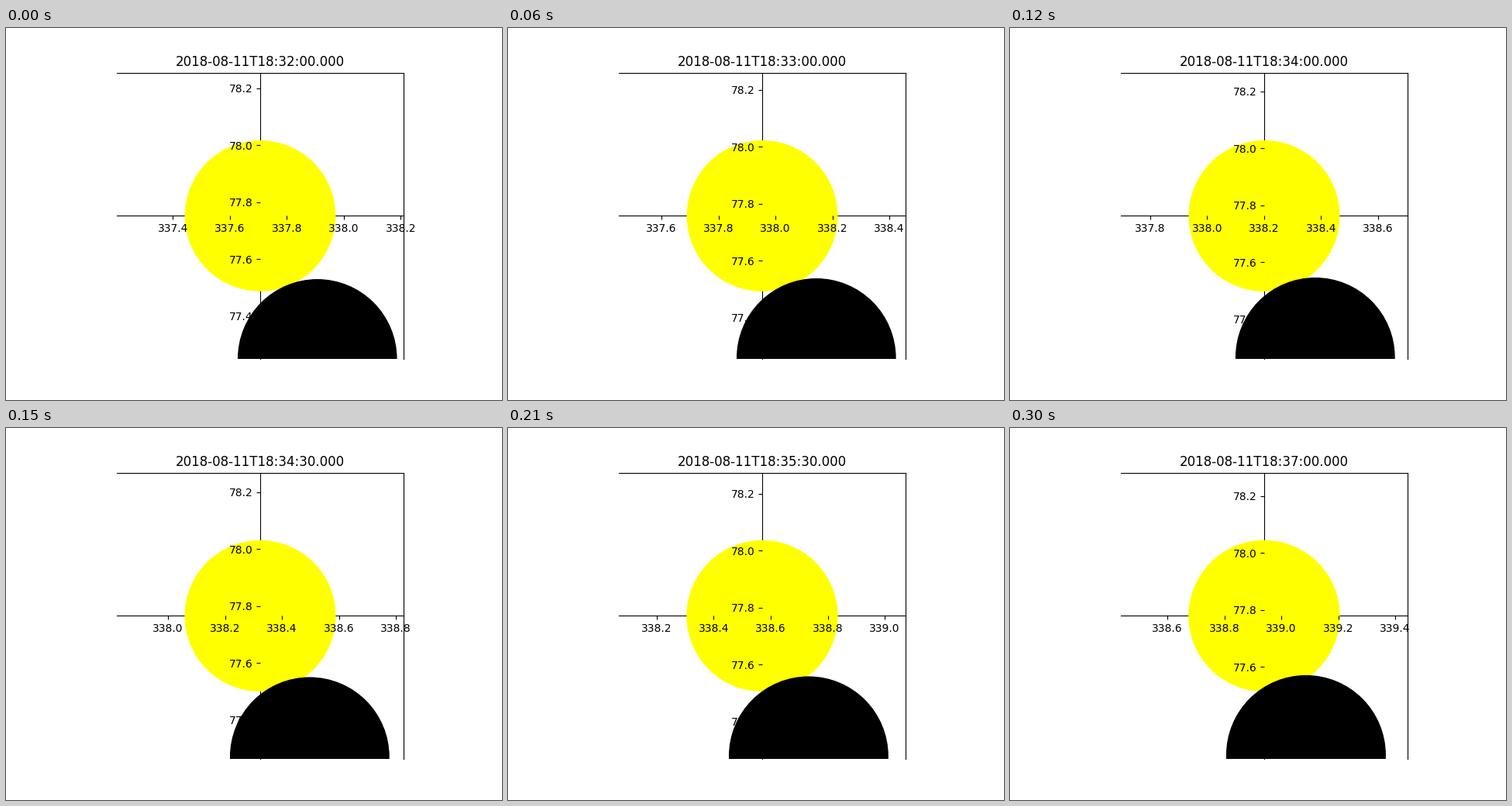
A matplotlib script that plays this animation: 640x480 px, repeating every 0.33 s.

```python
import matplotlib.pyplot as plt
from matplotlib.animation import FuncAnimation
from matplotlib.patches import Circle
from matplotlib.ticker import FormatStrFormatter, MultipleLocator

FRAMES = 11
HALF_VIEW = 0.5027  # degrees from the centre to each edge

plt.rcParams["font.family"] = "DejaVu Sans"
fig, ax = plt.subplots(figsize=(6.4, 4.8), dpi=100)
ax.set_aspect("equal")
ax.set_axisbelow(False)

# Axes cross at the sun's centre; the lines pass behind the discs, ticks in front.
for side in ("left", "bottom"):
    ax.spines[side].set_position("center")
for spine in ax.spines.values():
    spine.set_zorder(0.5)
for axis in (ax.xaxis, ax.yaxis):
    axis.set_major_locator(MultipleLocator(0.2))
    axis.set_major_formatter(FormatStrFormatter("%.1f"))

sun = ax.add_patch(Circle((0, 0), 0.265, fc="#ffff00", lw=0, zorder=1))
moon = ax.add_patch(Circle((0, 0), 0.28, fc="black", lw=0, zorder=3))
title = ax.set_title("")


def draw(step):
    x = 337.707 + 0.1233 * step
    y = 77.752 + 0.00272 * step
    ax.set_xlim(x - HALF_VIEW, x + HALF_VIEW)
    ax.set_ylim(y - HALF_VIEW, y + HALF_VIEW)

    sun.center = x, y
    sun.radius = 0.2648 + 0.0001 * step
    moon.center = x + 0.2006 - 0.00539 * step, y - 0.5016 + 0.00133 * step
    moon.radius = 0.2796 + 0.00006 * step

    minutes, seconds = divmod(30 * step, 60)
    title.set_text(f"2018-08-11T18:{32 + minutes}:{seconds:02d}.000")
    return sun, moon, title


anim = FuncAnimation(fig, draw, frames=FRAMES, interval=30, repeat=True,
                     repeat_delay=0, blit=False)
plt.show()
```
